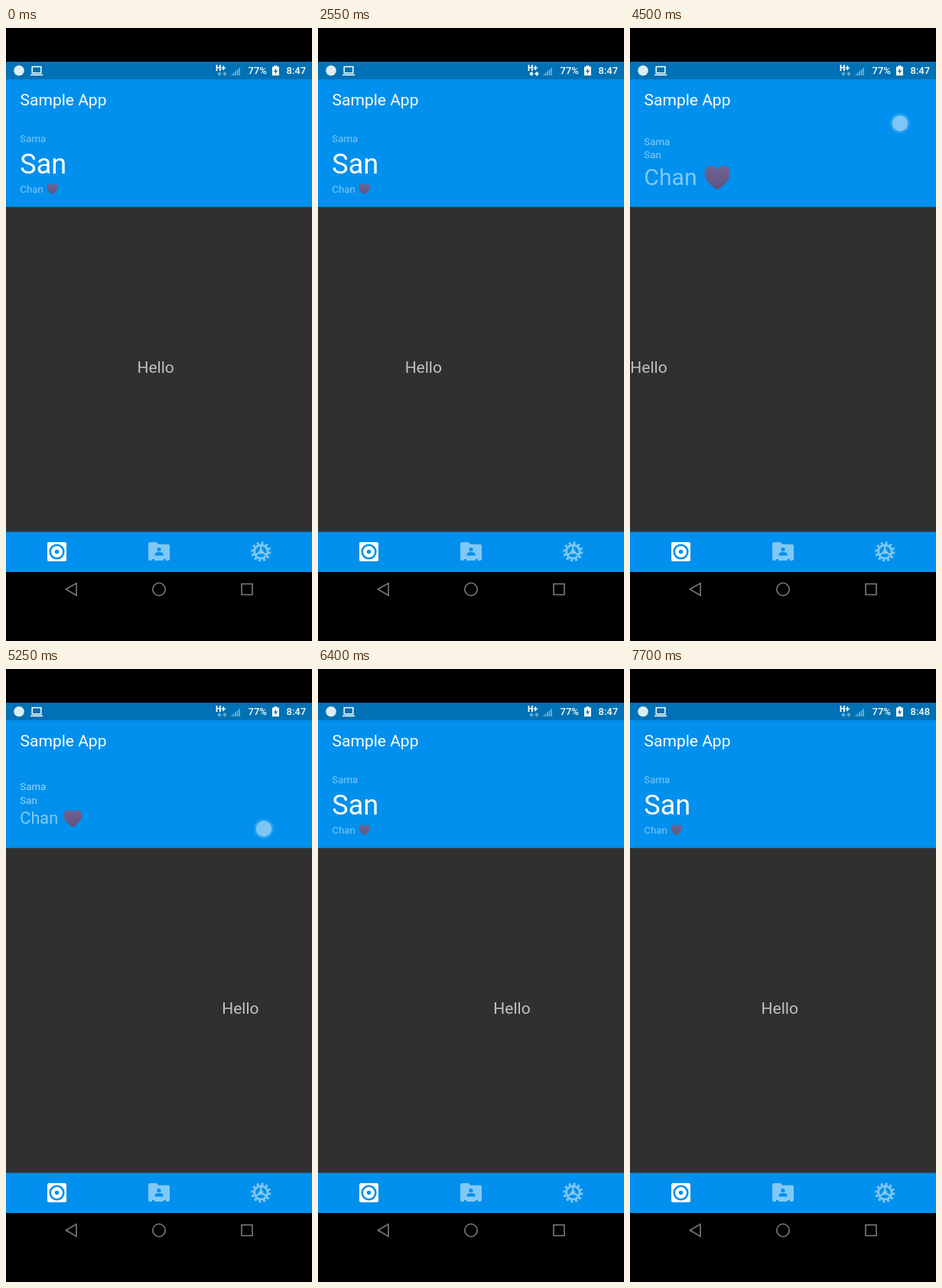
These frames come from a looping animation (400x800 px, 8000 ms). An HTML page:

```html
<!DOCTYPE html>
<html lang="en">
<head>
<meta charset="utf-8">
<title>Sample App</title>
<style>
  html, body { margin: 0; width: 100%; height: 100%; overflow: hidden; background: #000; }
  svg { display: block; width: 400px; height: 800px; font-family: Roboto, "Liberation Sans", sans-serif; }
  text { fill: #fff; white-space: pre; }
  .status { font-size: 13px; font-weight: 500; }
  .nav { fill: none; stroke: #7b7b7b; stroke-width: 1.6; }
</style>
</head>
<body>
<svg viewBox="0 0 400 800">
  <defs>
    <linearGradient id="red" x1="0" y1="0" x2="0" y2="1">
      <stop offset="0" stop-color="#df3535"/>
      <stop offset="1" stop-color="#b51c1f"/>
    </linearGradient>
    <radialGradient id="touch">
      <stop offset="0" stop-color="#a9d8fa" stop-opacity=".75"/>
      <stop offset=".66" stop-color="#a5d7f9" stop-opacity=".75"/>
      <stop offset=".74" stop-color="#6cbdf6" stop-opacity=".4"/>
      <stop offset="1" stop-color="#6cbdf6" stop-opacity="0"/>
    </radialGradient>
  </defs>

  <rect width="400" height="800"/>
  <rect y="44" width="400" height="23" fill="#0071b5"/>
  <rect y="67" width="400" height="167" fill="#0190ed"/>
  <rect y="233.6" width="400" height="424.4" fill="#303030"/>
  <rect y="657.6" width="400" height="52.4" fill="#0190ed"/>

  <!-- status bar -->
  <circle cx="17" cy="55.5" r="6.8" fill="#dcedf8"/>
  <path d="M34.2 50.6h11.6v8.2H34.2zM32 61.2h16" fill="none" stroke="#fff" stroke-width="1.5"/>
  <text x="274" y="56.3" font-size="10.5" font-weight="900">H+</text>
  <path id="data" d="M279 56.8l2.7 3-2.7 3-2.7-3zM286 56.8l2.7 3-2.7 3-2.7-3z" fill="#fff"/>
  <g id="signal" fill="#fff"></g>
  <text class="status" x="316.5" y="60.2">77%</text>
  <path d="M350.6 49h3.8v1.6h2.6V62h-9V50.6h2.6z" fill="#fff"/>
  <path d="M353.3 52.2l-3.3 4.8h2.2l-.5 3.6 3.4-5h-2.3z" fill="#0071b5"/>
  <text id="clock" class="status" x="366.5" y="60.2"></text>

  <text x="18.6" y="101" font-size="21">Sample App</text>
  <g id="list"></g>
  <g id="pages" font-size="21"></g>

  <!-- bottom tabs -->
  <rect x="54" y="671" width="25" height="25" rx="2" fill="#fff"/>
  <circle cx="66.5" cy="683.5" r="8.8" fill="none" stroke="#0190ed" stroke-width="2.6"/>
  <circle cx="66.5" cy="683.5" r="2.8" fill="#0190ed"/>
  <g fill="#80c8f6">
    <path d="M188 671h8.5l2.8 2.7H212q2 0 2 2V693q0 2-2 2h-3v-2h-3v2H194v-2h-3v2h-3q-2 0-2-2V673q0-2 2-2z"/>
    <path d="M194.500 688.500v-1.400q0-3 5.500-3t5.500 3v1.400z" fill="#0190ed"/>
    <circle cx="200" cy="680.5" r="2.6" fill="#0190ed"/>
  </g>
  <g transform="translate(333.3 683.5)" fill="none" stroke="#80c8f6">
    <circle r="8.7" stroke-width="2.8"/>
    <circle r="11.46" stroke-width="3" stroke-dasharray="3 3"/>
    <path d="M0 0V-8M0 0l6.9 4M0 0l-6.9 4" stroke-width="2.2"/>
    <circle r="2.6" fill="#80c8f6"/>
  </g>

  <!-- system buttons -->
  <path class="nav" d="M78.3 732.5L92 724.6v15.8z"/>
  <circle class="nav" cx="200" cy="732.5" r="8.2"/>
  <rect class="nav" x="308" y="725.5" width="14" height="14"/>

  <circle id="finger" r="14.5" fill="url(#touch)"/>
</svg>
<script>
const LOOP = 8000, PAGE = 400, FLING = 360;
const BIG = 36, SMALL = 13.3, MIDDLE = 177;
const HEART = 'M114.5 6.6C106 2.500 94.500-8 94.500-19C94.500-27 100-30.600 104.800-30.600C109.500-30.600 113-28 114.500-24.500' +
  'C116-28 119.500-30.600 124.200-30.600C129-30.600 134.500-27 134.500-19C134.500-8 123 2.500 114.500 6.600Z';

const swipe = (start, step, ms = 130) => ({ start, step, ms });
const SWIPES = [
  swipe(940, 1), swipe(2400, -1), swipe(3087, -1),
  swipe(4230, 1), swipe(4447, 1, 62),
  swipe(5210, -1), swipe(5816, -1, 120),
  swipe(6250, 1), swipe(7012, -1), swipe(7370, 1)
];
const DATA_ON = [[100, 950], [2400, 3650], [6900, 7200]];

const byId = id => document.getElementById(id);
const clamp = v => Math.min(1, Math.max(0, v));
const mix = (a, b, p) => a + (b - a) * p;
const easeOut = p => 1 - (1 - p) ** 4;
const smooth = p => p * p * (3 - 2 * p);

function add(parent, tag, attrs, text = '') {
  const node = document.createElementNS('http://www.w3.org/2000/svg', tag);
  for (const key in attrs) node.setAttribute(key, attrs[key]);
  node.textContent = text;
  return parent.appendChild(node);
}

const rows = ['Sama', 'San', 'Chan'].map(name => {
  const group = add(byId('list'), 'g', {});
  const label = add(group, 'text', { 'font-size': BIG }, name);
  const heart = name === 'Chan' && add(group, 'path', { d: HEART, fill: 'url(#red)' });
  return { group, label, heart };
});
const pages = rows.map(() => add(byId('pages'), 'text', { y: 450, 'fill-opacity': .7 }, 'Hello'));
for (let i = 0; i < 5; i++) {
  const height = 2 + i * 2;
  add(byId('signal'), 'rect', { x: 295 + i * 2.4, y: 62 - height, width: 1.2, height, opacity: .6 });
}

// The second item is selected first; every swipe adds its share of a step.
const position = progress => SWIPES.reduce((sum, s) => sum + s.step * progress(s), 1);

function drawList(pos) {
  const sizes = rows.map((_, i) => clamp(1 - 2 * Math.abs(i - pos)));
  const peak = Math.max(...sizes);
  const fonts = sizes.map(s => mix(SMALL, BIG, s));
  const heights = fonts.map(f => f * 4 / 3);
  let y = MIDDLE - heights.reduce((a, b) => a + b) / 2;
  rows.forEach(({ group, label, heart }, i) => {
    const s = sizes[i];
    const alpha = s > 0
      ? .5 + .5 * clamp(s * 4 - 3) + .2 * clamp(1 - s / .4)
      : .5 + .2 * (1 - peak);
    const base = y + heights[i] / 2 + fonts[i] * .355;
    group.setAttribute('transform', `translate(18.3 ${base}) scale(${fonts[i] / BIG})`);
    label.setAttribute('fill-opacity', alpha);
    if (heart) heart.setAttribute('opacity', alpha);
    y += heights[i];
  });
}

function drawFinger(t) {
  const finger = byId('finger');
  const s = SWIPES.find(({ start }) => Math.abs(t - start) < 100);
  finger.setAttribute('opacity', s ? 1 : 0);
  if (!s) return;
  const p = smooth(clamp((t - s.start + 25) / 85));
  finger.setAttribute('cx', 345 + 8 * s.step);
  finger.setAttribute('cy', 172 + 49 * s.step * (1 - 2 * p));
}

function draw(t) {
  drawList(position(s => clamp((t - s.start) / s.ms)));
  const page = position(s => easeOut(clamp((t - s.start - s.ms / 10) / FLING)));
  pages.forEach((p, i) => p.setAttribute('x', 171.5 + (i - page) * PAGE));
  drawFinger(t);
  byId('data').setAttribute('opacity', DATA_ON.some(([a, b]) => t >= a && t < b) ? 1 : .4);
  byId('clock').textContent = t < 6900 ? '8:47' : '8:48';
}

const start = performance.now();
function tick() {
  draw((performance.now() - start) % LOOP);
  requestAnimationFrame(tick);
}
tick();
</script>
</body>
</html>
```
